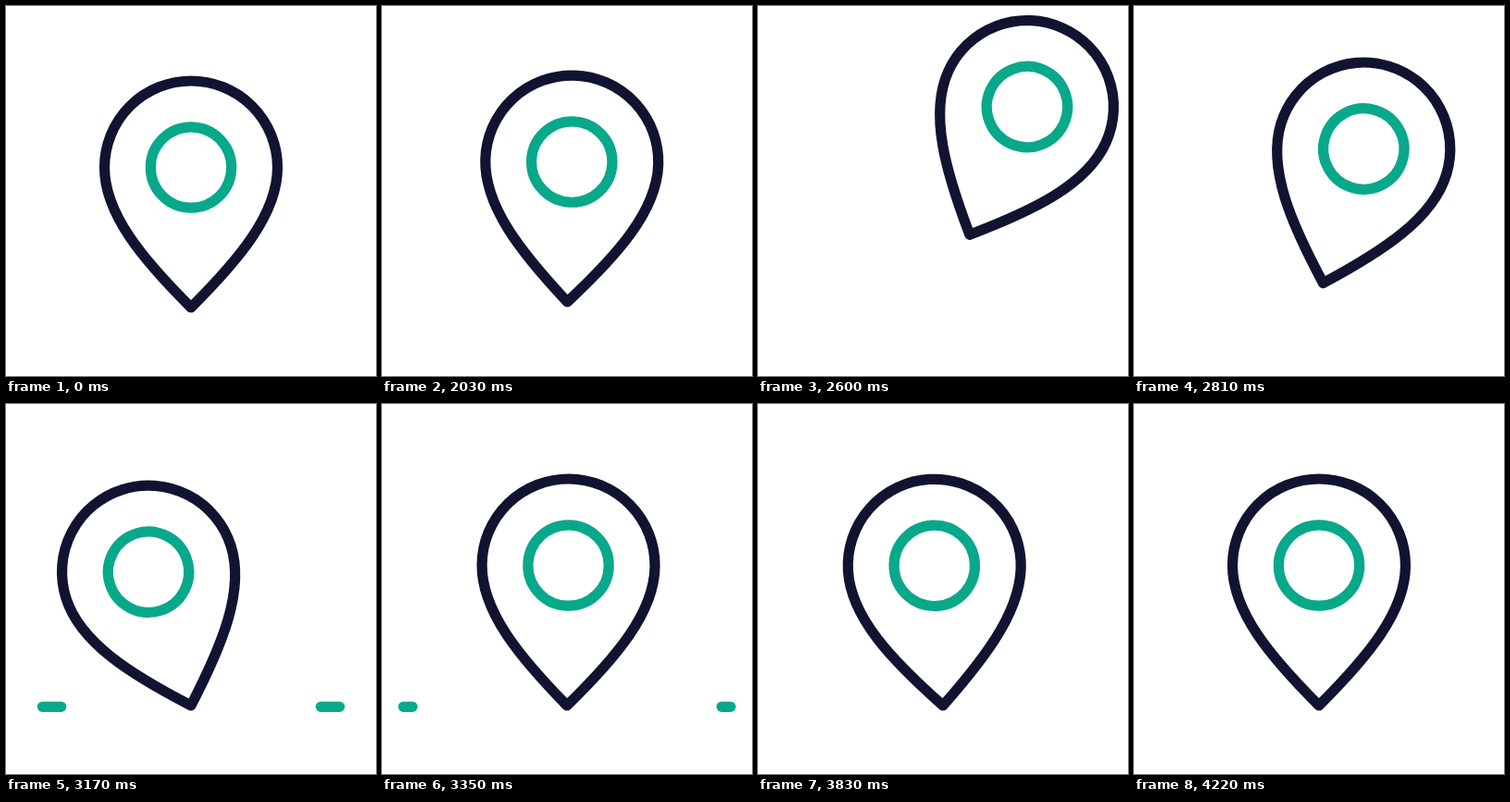
These frames come from a looping animation (400x400 px, 4.49 s). An HTML page with a canvas:

```html
<!DOCTYPE html>
<html lang="en">
<head>
<meta charset="utf-8">
<title>Location pin</title>
<style>
  html, body { margin: 0; width: 100%; height: 100%; overflow: hidden; background: #fff; }
  canvas { display: block; width: 100vw; height: 100vh; }
</style>
</head>
<body>
<canvas id="stage" width="400" height="400"></canvas>
<script>
const ctx = document.getElementById('stage').getContext('2d');
const NAVY = '#121331', TEAL = '#08a88a';
const LOOP = 4490, HOLD = 2030, STEP = 30;

// Keys: [step, value, slope], joined by cubic Hermite curves
const TILT = [
  [0.25, 0, 2.51], [19.5, 24.2, 0], [27, 16.8, -3], [37.4, -19, 0],
  [50, 11, 0], [62, -3.8, 0], [74, 0, 0]
];
const LIFT = [[0.25, 0, 0.104], [19.5, 1, 0], [27, 0.335, -0.165], [29, 0, -0.17]];
const DASH = { start: 29, end: 54, travel: 122, reach: 180, y: 327.3 };

function valueAt(keys, s) {
  if (s <= keys[0][0]) return keys[0][1];
  const i = keys.findIndex(key => s < key[0]);
  if (i < 0) return keys[keys.length - 1][1];
  const [t0, a, m0] = keys[i - 1], [t1, b, m1] = keys[i];
  const d = t1 - t0, u = (s - t0) / d, u2 = u * u, u3 = u2 * u;
  return a + (b - a) * (3 * u2 - 2 * u3)
    + d * (m0 * (u3 - 2 * u2 + u) + m1 * (u3 - u2));
}

function stroke(color, trace) {
  ctx.strokeStyle = color;
  ctx.beginPath();
  trace();
  ctx.stroke();
}

// The pin stands with its tip at the local origin
function drawPin(s) {
  const lift = Math.max(0, valueAt(LIFT, s));
  ctx.save();
  ctx.translate(200 + 29 * lift ** 1.7, 326 - 79 * lift);
  ctx.rotate(valueAt(TILT, s) * Math.PI / 180);
  stroke(NAVY, () => {
    ctx.moveTo(0, 0);
    ctx.bezierCurveTo(-52, -52, -93.5, -101, -93.5, -151.5);
    ctx.arc(0, -151.5, 93.5, Math.PI, 0);
    ctx.bezierCurveTo(93.5, -101, 52, -52, 0, 0);
    ctx.closePath();
  });
  stroke(TEAL, () => ctx.arc(0, -151.5, 43.7, 0, 2 * Math.PI));
  ctx.restore();
}

function drawDashes(s) {
  if (s < DASH.start || s >= DASH.end) return;
  const left = (DASH.end - s) / (DASH.end - DASH.start);
  const lead = DASH.reach - DASH.travel * left ** 3.6;
  const tail = DASH.reach - DASH.travel * left ** 2.2;
  for (const side of [-1, 1]) {
    stroke(TEAL, () => {
      ctx.moveTo(200 + side * tail, DASH.y);
      ctx.lineTo(200 + side * lead + side * 0.01, DASH.y);
    });
  }
}

function draw(now) {
  const t = now % LOOP;
  const s = t < HOLD ? 0 : Math.floor((t - HOLD) / STEP) + 1;
  ctx.fillStyle = '#fff';
  ctx.fillRect(0, 0, 400, 400);
  ctx.lineWidth = 11.2;
  ctx.lineCap = ctx.lineJoin = 'round';
  drawDashes(s);
  drawPin(s);
}

const begin = performance.now();
function tick() {
  draw(performance.now() - begin);
  requestAnimationFrame(tick);
}
tick();
</script>
</body>
</html>
```
